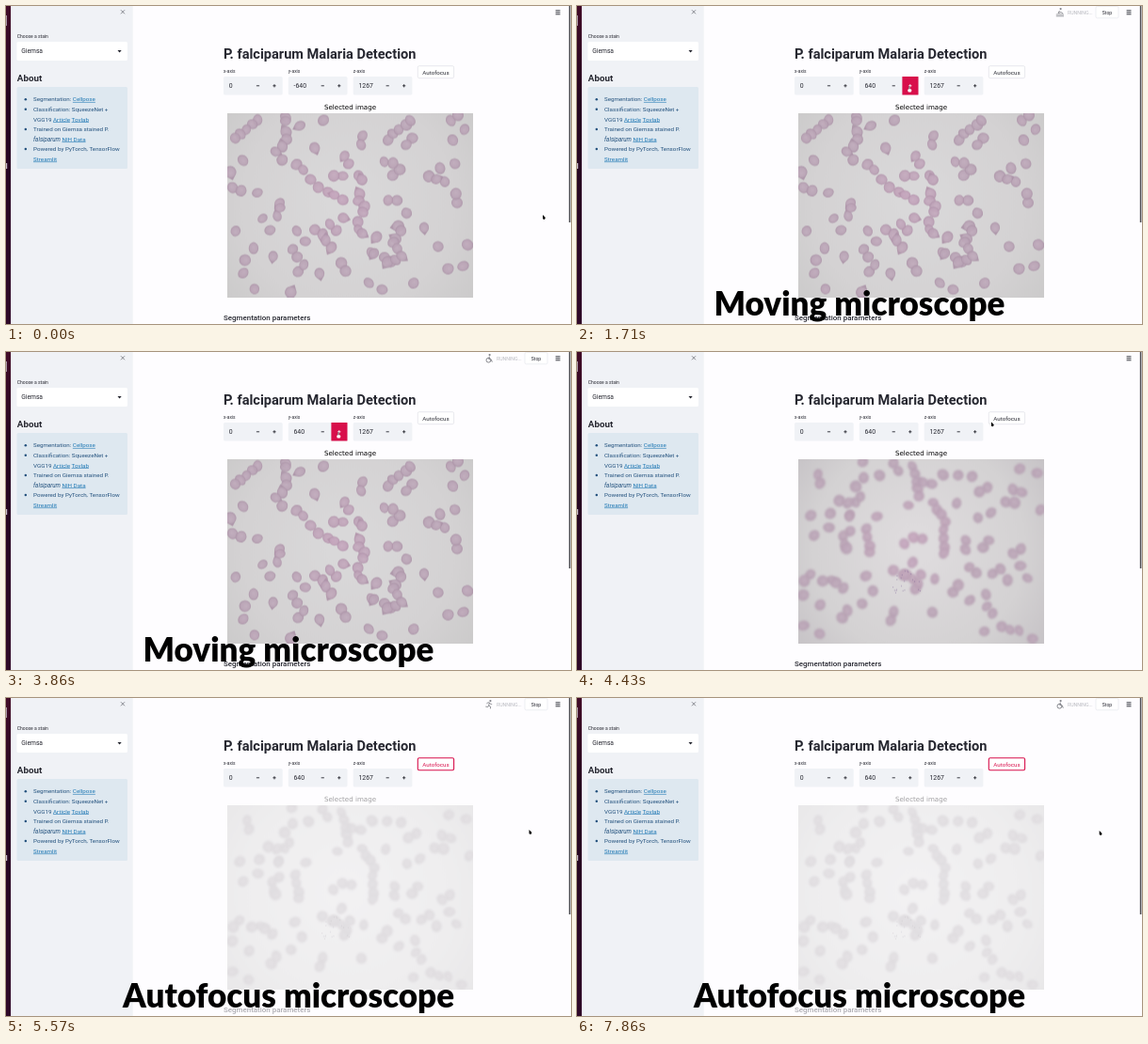
Animation of 600x338 px, one loop 8000 ms. Source, as an HTML page with a canvas:

```html
<!DOCTYPE html>
<html lang="en">
<head>
<meta charset="utf-8">
<title>Malaria Detection</title>
<style>
html, body { margin: 0; width: 100%; height: 100%; overflow: hidden; background: #fefdff; }
canvas { display: block; width: 600px; height: 338px; }
</style>
</head>
<body>
<canvas id="stage"></canvas>
<script>
const W = 600, H = 338, LOOP = 8000, STEP = 1000 / 7;
const SCALE = Math.max(1, window.devicePixelRatio || 1);
const PHOTO = { x: 235, y: 113.5, w: 261, h: 196 };
const INK = '#262730', PANEL = '#f0f2f6', RED = '#d80f4b', NAVY = '#24527e', BLUE = '#1f78b4';
const SANS = 'Roboto, sans-serif';

const stage = document.getElementById('stage');
stage.width = W * SCALE;
stage.height = H * SCALE;
const ctx = stage.getContext('2d');
ctx.scale(SCALE, SCALE);

function seeded(seed) {
  return () => {
    seed = (seed * 1664525 + 1013904223) >>> 0;
    return seed / 4294967296;
  };
}

// Cells lie along a few chains; loose ones and pairs fill the rest.
function scatter(chains, total, rnd) {
  const points = [];
  for (const [x0, y0, x1, y1] of chains) {
    const n = Math.round(Math.hypot(x1 - x0, y1 - y0) / 8.5);
    const sway = n > 4 ? 9 : 3;
    for (let i = 0; i <= n; i++) {
      points.push([
        x0 + (x1 - x0) * i / n + (rnd() - 0.5) * sway,
        y0 + (y1 - y0) * i / n + (rnd() - 0.5) * sway
      ]);
    }
  }
  const isFree = (x, y, gap) => points.every(p => Math.hypot(p[0] - x, p[1] - y) > gap);
  for (let tries = 0; points.length < total && tries < 4000; tries++) {
    const x = PHOTO.x + 3 + rnd() * (PHOTO.w - 6);
    const y = PHOTO.y + 3 + rnd() * (PHOTO.h - 6);
    if (!isFree(x, y, 14)) continue;
    points.push([x, y]);
    if (rnd() < 0.4) {
      const turn = rnd() * Math.PI * 2;
      points.push([x + 9.5 * Math.cos(turn), y + 9.5 * Math.sin(turn)]);
    }
  }
  return points;
}

function cell(g, x, y, r, soft, rnd) {
  const pink = Math.max(0, 1 - Math.hypot(x - 352, y - 203) / 75);
  const tone = d => `rgba(${185 + 9 * pink - d},${163 - d * 1.15},${181 + 5 * pink - d},.92)`;
  g.save();
  g.translate(x, y);
  g.rotate(rnd() * Math.PI * 2);
  g.scale(1, 0.8 + rnd() * 0.2);
  const fill = g.createRadialGradient(r * 0.25, 0, 0, 0, 0, r);
  fill.addColorStop(0, tone(-7));
  fill.addColorStop(0.7, tone(0));
  fill.addColorStop(1, tone(soft ? 6 : 14));
  g.fillStyle = fill;
  g.beginPath();
  g.arc(0, 0, r, 0.7, Math.PI * 2 - 0.7);
  if (!soft && rnd() < 0.25) g.lineTo(r * 1.45, 0);
  else g.arc(0, 0, r, -0.7, 0.7);
  g.closePath();
  g.fill();
  g.restore();
}

function makePhoto(chains, total, soft) {
  const image = document.createElement('canvas');
  image.width = PHOTO.w * SCALE;
  image.height = PHOTO.h * SCALE;
  const g = image.getContext('2d');
  const rnd = seeded(soft ? 23 : 71);
  g.scale(SCALE, SCALE);
  g.translate(-PHOTO.x, -PHOTO.y);
  const light = g.createRadialGradient(360, 205, 20, 365, 211, 175);
  light.addColorStop(0, soft ? '#dedbdd' : '#d9d8d9');
  light.addColorStop(0.6, '#d4d2d3');
  light.addColorStop(1, soft ? '#c4c0c4' : '#cac9c9');
  g.fillStyle = light;
  g.fillRect(PHOTO.x, PHOTO.y, PHOTO.w, PHOTO.h);
  g.filter = `blur(${(soft ? 1.1 : 0.4) * SCALE}px)`;
  for (const [x, y] of scatter(chains, total, rnd)) {
    cell(g, x, y, 5.6 + rnd() * 0.8, soft, rnd);
  }
  g.filter = 'none';
  if (soft) {
    g.fillStyle = 'rgba(110,82,140,.6)';
    for (let i = 0; i < 22; i++) g.fillRect(335 + rnd() * 32, 232 + rnd() * 24, 0.9, 0.9);
  }
  return image;
}

// Each chain: x, y of its start and end.
const sharpPhoto = makePhoto([
  [299, 116, 289, 164], [268, 121, 242, 141], [309, 168, 322, 183], [333, 194, 358, 206],
  [405, 141, 430, 123], [375, 179, 378, 246], [422, 224, 409, 270], [384, 266, 424, 270]
], 116, false);
const softPhoto = makePhoto([
  [357, 122, 364, 152], [379, 160, 392, 180], [390, 190, 389, 214], [302, 136, 282, 212],
  [308, 188, 312, 213], [338, 236, 376, 242], [358, 253, 364, 246]
], 112, true);

function text(str, x, y, size, color = INK, weight = 400, align = 'left', family = SANS) {
  ctx.font = `${weight} ${size}px ${family}`;
  ctx.fillStyle = color;
  ctx.textAlign = align;
  ctx.fillText(str, x, y);
  return ctx.measureText(str).width;
}

function box(x, y, w, h, r, fill, stroke, width = 0.7) {
  ctx.beginPath();
  ctx.roundRect(x, y, w, h, r);
  if (fill) { ctx.fillStyle = fill; ctx.fill(); }
  if (stroke) { ctx.strokeStyle = stroke; ctx.lineWidth = width; ctx.stroke(); }
}

function dot(x, y, r, color) {
  ctx.beginPath();
  ctx.arc(x, y, r, 0, Math.PI * 2);
  ctx.fillStyle = color;
  ctx.fill();
}

function line(points, color, width) {
  ctx.beginPath();
  for (let i = 0; i < points.length; i += 2) ctx.lineTo(points[i], points[i + 1]);
  ctx.strokeStyle = color;
  ctx.lineWidth = width;
  ctx.stroke();
}

// Parts in [brackets] become links, parts in /slashes/ are slanted.
function richText(str, x, y) {
  for (const part of str.split(/(\[.+?\]|\/.+?\/)/)) {
    const isLink = part[0] === '[', slanted = part[0] === '/';
    const plain = isLink || slanted ? part.slice(1, -1) : part;
    const w = text(plain, x, y, 6.25, isLink ? BLUE : NAVY, slanted ? 'italic 400' : 400);
    if (isLink) line([x, y + 1, x + w, y + 1], BLUE, 0.6);
    x += w;
  }
}

const ABOUT = [
  '\u2022Segmentation: [Cellpose]', '\u2022Classification: SqueezeNet +', 'VGG19 [Article] [Tovlab]',
  '\u2022Trained on Giemsa stained P.', '/falsiparum/ [NIH Data]',
  '\u2022Powered by PyTorch, TensorFlow', '[Streamlit]'
];

function sidebar() {
  const strip = ctx.createLinearGradient(0, 0, 0, H);
  strip.addColorStop(0, '#420b28');
  strip.addColorStop(0.3, '#25051f');
  strip.addColorStop(1, '#2f0728');
  ctx.fillStyle = strip;
  ctx.fillRect(0, 0, 5.3, H);
  ctx.fillStyle = '#c9bdc8';
  ctx.fillRect(0, 10, 0.8, 11);
  ctx.fillRect(0, 167, 1.2, 6);
  ctx.fillStyle = PANEL;
  ctx.fillRect(5.3, 0, 129.4, H);

  for (const s of [-2, 2]) line([124 - s, 4.3, 124 + s, 8.3], '#83858c', 1);
  text('Choose a stain', 11.8, 33.7, 5);
  box(11.5, 38, 117.5, 20, 1.5, '#fff');
  text('Giemsa', 16.3, 50.4, 6.7);
  ctx.beginPath();
  ctx.moveTo(118.5, 47);
  ctx.lineTo(122.7, 47);
  ctx.lineTo(120.6, 49.4);
  ctx.fill();
  text('About', 11.8, 79.6, 9.8, INK, 700);

  box(11.5, 86, 117.5, 87, 1.5, '#dee8f0');
  ABOUT.forEach((row, i) => {
    const y = 101.4 + i * 10.55;
    if (row[0] === '\u2022') dot(20.8, y - 2.1, 1.25, NAVY);
    richText(row.replace('\u2022', ''), 29, y);
  });
}

function sign(x, y, color, plus) {
  line([x - 1.6, y, x + 1.6, y], color, 0.9);
  if (plus) line([x, y - 1.6, x, y + 1.6], color, 0.9);
}

function numberInput(x, label, value, active) {
  text(label, x, 70.6, 4.9);
  box(x, 75, 62.7, 19.5, 1.5, PANEL);
  text(value, x + 5.7, 87.2, 6.9);
  sign(x + 36.5, 84.8, INK);
  if (active) box(x + 45.6, 75, 17.1, 19.5, 0.5, RED);
  sign(x + 54, 84.8, active ? '#fff' : INK, true);
}

// The status figure runs, then rows, then wheels, every two seconds.
function athlete(step) {
  const beat = step % 14, c = '#85868c';
  dot(beat < 12 ? 514.4 : 513.6, 3.1, 1.1, c);
  if (beat === 12) {
    line([512.5, 5, 511, 7.6, 514, 6.6, 516, 8], c, 0.9);
    for (const y of [9, 10.8]) line([508.8, y, 517, y], c, 0.8);
  } else if (beat === 13) {
    line([513.4, 4.8, 512.6, 7.4, 515, 7.6, 516.3, 10.6], c, 1);
    ctx.beginPath();
    ctx.arc(512.4, 8.7, 2.4, 0, Math.PI * 2);
    ctx.stroke();
  } else {
    line([510.5, 6.2, 511.6, 4.8, 513.5, 5, 512.6, 8, 514.6, 9.2, 514.4, 11.4], c, 0.9);
    line([513.5, 5, 514.6, 6.5, 516.2, 6.7], c, 0.8);
    line([512.6, 8, 511.8, 9.5, 509.3, 9.1], c, 0.9);
  }
}

function header(step, running) {
  if (running) {
    athlete(step);
    text('RUNNING...', 521, 9.2, 5.2, '#b9bac0');
    box(551, 0.4, 24, 12.4, 1.5, '#fff', '#e6e7ec');
    text('Stop', 563, 8.7, 5.1, INK, 400, 'center');
  }
  for (const y of [4.8, 6.8, 8.8]) line([583.6, y, 588.5, y], '#3b3c45', 1);
  ctx.fillStyle = '#4f4f54';
  ctx.fillRect(597.8, 0, 1.6, 230);
}

function photo(image, alpha) {
  ctx.save();
  ctx.globalAlpha = alpha;
  if (alpha < 1) ctx.filter = 'grayscale(0.75)';
  ctx.drawImage(image, PHOTO.x, PHOTO.y, PHOTO.w, PHOTO.h);
  ctx.filter = 'none';
  text('Selected image', 365.5, 109.8, 7.1, '#000', 400, 'center', '"DejaVu Sans", sans-serif');
  text('Segmentation parameters', 231, 333.5, 7.95, INK, 500);
  ctx.restore();
}

// Each stop: step, x, y.
const PATH = [
  [1, 570, 222], [5, 353, 87], [28, 353, 87], [32, 456, 72], [35, 542.5, 128], [39, 555.5, 140], [43, 554.7, 141]
];

function cursorAt(step) {
  const next = PATH.findIndex(stop => stop[0] > step);
  if (next < 1) return PATH.at(next).slice(1);
  const [s0, x0, y0] = PATH[next - 1], [s1, x1, y1] = PATH[next];
  const u = (step - s0) / (s1 - s0), e = u * u * (3 - 2 * u);
  return [x0 + (x1 - x0) * e, y0 + (y1 - y0) * e];
}

function cursor(step) {
  const [x, y] = cursorAt(step);
  const hand = within(step, 5, 29) || within(step, 32, 33);
  ctx.save();
  ctx.translate(x, y);
  if (hand) {
    box(-0.6, -1.5, 1.2, 4, 0.5, '#fff', '#222', 0.4);
    box(-1.6, 1.2, 3.8, 3.2, 1, '#fff');
  } else {
    ctx.beginPath();
    ctx.moveTo(0, 0);
    ctx.lineTo(0, 4.3);
    ctx.lineTo(1.9, 4.9);
    ctx.lineTo(2.9, 3.1);
    ctx.closePath();
    ctx.fillStyle = '#000';
    ctx.fill();
  }
  ctx.restore();
}

function within(step, from, to) {
  return step >= from && step < to;
}

function opacity(step) {
  const from = step < 26 ? 13 : 37;
  return 1 - 0.63 * Math.min(1, Math.max(0, (step - from) / 2));
}

function draw(step) {
  const moving = within(step, 5, 30), focusing = step >= 37, pressed = step >= 32;
  ctx.fillStyle = '#fefdff';
  ctx.fillRect(0, 0, W, H);
  sidebar();
  header(step, within(step, 10, 30) || step >= 34);

  text('P. falciparum Malaria Detection', 231, 55.7, 14.58, INK, 700);
  numberInput(231, 'x-axis', '0', false);
  numberInput(299.8, 'y-axis', step < 6 ? '-640' : step < 9 ? '0' : '640', moving);
  numberInput(368.7, 'z-axis', '1267', false);
  box(437.3, 63.7, 38.3, 13, 1.5, '#fff', pressed ? RED : '#dfe0e5', pressed ? 1.1 : 0.7);
  text('Autofocus', 456.5, 72.5, 6.2, pressed ? RED : INK, 400, 'center');

  photo(step < 30 ? sharpPhoto : softPhoto, opacity(step));

  const caption = moving ? 'Moving microscope' : focusing ? 'Autofocus microscope' : '';
  text(caption, 300, 329, 35, '#000', 900, 'center', 'Lato, sans-serif');
  cursor(step);
}

const start = performance.now();
function tick() {
  const time = (performance.now() - start) % LOOP;
  draw(Math.min(55, Math.floor((time + 4) / STEP)));
  requestAnimationFrame(tick);
}
tick();
</script>
</body>
</html>
```
